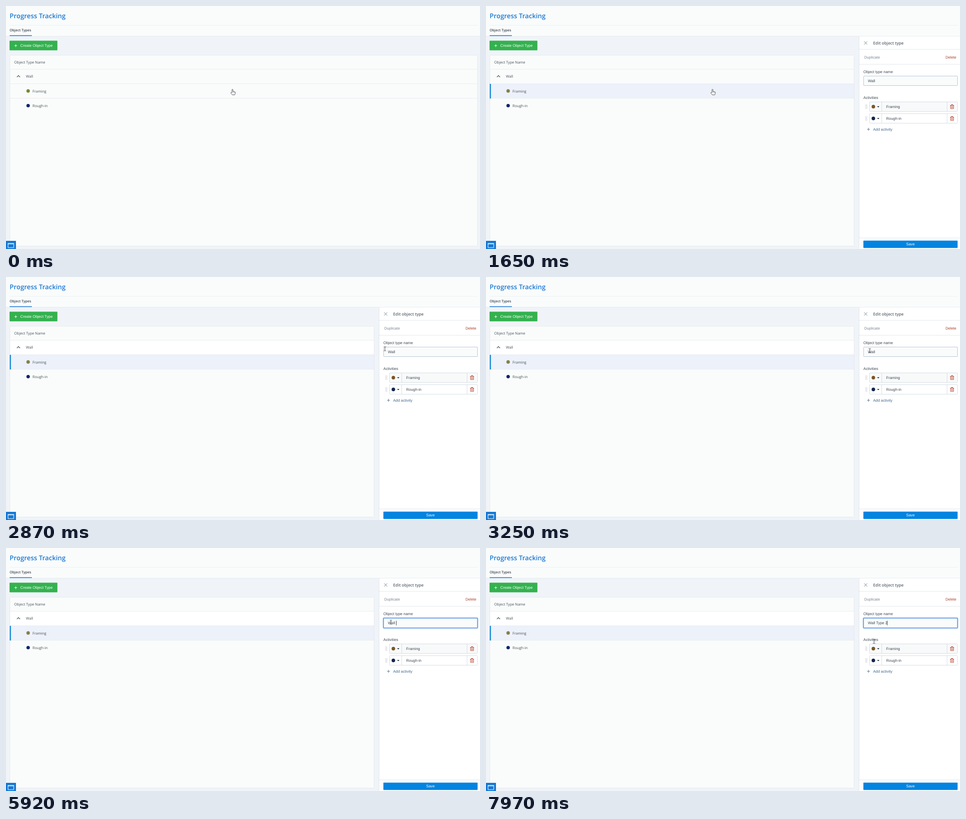
An HTML page with a canvas that plays this animation: 1045 by 536 pixels, repeating every 8 s.

```html
<!DOCTYPE html>
<html lang="en">
<head>
<meta charset="utf-8">
<title>Progress Tracking</title>
<style>
  html, body { margin: 0; width: 100%; height: 100%; overflow: hidden; background: #fafcfc; }
  canvas { display: block; width: 1045px; height: 536px; }
</style>
</head>
<body>
<canvas id="stage" width="1045" height="536"></canvas>
<script>
const ctx = document.getElementById('stage').getContext('2d');
const LOOP = 8000;
const SELECT_AT = 1480, PANEL_AT = 1560, HOVER_AT = 2160, LEAVE_AT = 2700, FOCUS_AT = 3310;
const UI = '"Open Sans", "Noto Sans", sans-serif';
const FORM = '"Liberation Sans", Arial, sans-serif';
const PAPER = '#fafcfc';

// Pointer path: time, x, y
const POINTER = [
  [0, 500.5, 190], [2090, 500.5, 190], [2300, 667, 169], [2490, 667, 169],
  [2560, 746, 154], [2640, 795, 153], [2760, 829, 156], [2950, 840, 160],
  [3250, 846, 162.5], [3300, 846, 162.5], [3520, 848.5, 163.5],
  [7500, 848.5, 163.5], [7620, 849, 168], [7970, 855.5, 206]
];

// Field states: time, text, caret index, caret visible
const TYPING = [
  [0, 'Wall', 0, false], [3400, 'Wall', 1, true], [3850, 'Wall', 2, true],
  [4050, 'Wall', 3, true], [4180, 'Wall', 4, true], [4700, 'Wall', 4, false],
  [4900, 'Wall ', 5, true], [5380, 'Wall ', 5, false], [5920, 'Wall ', 5, true],
  [6100, 'Wall T', 6, true], [6260, 'Wall Ty', 7, true], [6370, 'Wall Typ', 8, true],
  [6480, 'Wall Type', 9, true], [6660, 'Wall Type ', 10, true],
  [6870, 'Wall Type 2', 11, true], [7400, 'Wall Type 2', 11, false],
  [7930, 'Wall Type 2', 11, true]
];

const HAND = new Path2D('M-2.3 1V-5.3a1.1 1.1 0 0 1 2.2 0V-1.6l4 .9q1.4.4 1.2 1.9l-.6 3-.8 1.8H-1.4L-4.7 2.2q-.6-1.4.7-1.6z');

const clamp01 = v => Math.max(0, Math.min(1, v));

function rect(x, y, w, h, color) {
  ctx.fillStyle = color;
  ctx.fillRect(x, y, w, h);
}

function frame(x, y, w, h, color, fill, radius = 1) {
  ctx.beginPath();
  ctx.roundRect(x + .5, y + .5, w - 1, h - 1, radius);
  if (fill) { ctx.fillStyle = fill; ctx.fill(); }
  ctx.strokeStyle = color;
  ctx.lineWidth = 1;
  ctx.stroke();
}

function block(x, y, w, h, color) {
  ctx.beginPath();
  ctx.roundRect(x, y, w, h, 1.2);
  ctx.fillStyle = color;
  ctx.fill();
}

function dot(x, y, r, color) {
  ctx.beginPath();
  ctx.arc(x, y, r, 0, Math.PI * 2);
  ctx.fillStyle = color;
  ctx.fill();
}

function stroke(d, color, width = 1) {
  ctx.strokeStyle = color;
  ctx.lineWidth = width;
  ctx.stroke(new Path2D(d));
}

function text(str, x, y, color, size = 8, family = UI, weight = 400) {
  ctx.font = `${weight} ${size}px ${family}`;
  ctx.fillStyle = color;
  ctx.fillText(str, x, y);
}

const formText = (str, x, y, color = '#3d4750') => text(str, x, y, color, 8.3, FORM);

function pointerAt(t) {
  let i = POINTER.length - 1;
  while (i && POINTER[i][0] > t) i--;
  const a = POINTER[i], b = POINTER[i + 1] || a;
  const k = b === a ? 0 : (t - a[0]) / (b[0] - a[0]);
  return [a[1] + (b[1] - a[1]) * k, a[2] + (b[2] - a[2]) * k];
}

function drawHeader() {
  rect(0, 0, 1045, 536, PAPER);
  text('Progress Tracking', 8, 27, '#1e7ad3', 14.6, UI, 600);
  rect(8, 42, 1032, 1, '#eceff2');
  text('Object Types', 8, 56, '#3a4650', 7.7, UI, 600);
  rect(0, 66, 1045, 470, '#f0f4f8');
  rect(0, 66, 1045, 1, '#e8ecf1');
  rect(8, 64.5, 49, 1.7, '#2380d8');
  block(7.8, 76.4, 105.5, 21.4, '#34b14f');
  stroke('M18.5 87.5h6M21.5 84.5v6', '#fff');
  formText('Create Object Type', 31.5, 89.7, '#fff');
}

function drawTable(t) {
  const selected = t >= SELECT_AT;
  const right = t >= PANEL_AT ? 812 : 1040;
  const width = right - 9;
  frame(8, 108, right - 8, 422, '#e5e9ee', '#fafcfb');
  if (t >= HOVER_AT) rect(9, 140, width - 1, 31, t < LEAVE_AT ? '#f9fafc' : '#fff');
  if (selected) rect(9, 172, width - 1, 32, '#edf1fa');
  for (const y of [139, 171, 203]) rect(9, y, width - 1, 1, '#e8ecf0');
  if (selected) rect(8.3, 171.7, 2.5, 32.3, '#0e86d8');

  const ink = '#46505a';
  text('Object Type Name', 18, 127, ink);
  stroke('M24 156.8l3.5-3.5 3.5 3.5', '#2f3942', 1.1);
  text('Wall', 44, 158, ink);
  dot(48.8, 187.4, 3.8, selected ? '#83804a' : '#78883c');
  text('Framing', 58.5, 191, ink);
  dot(48.8, 219.7, 3.8, '#10256b');
  text('Rough-in', 58.5, 223, ink);
}

function drawDock() {
  rect(0, 518, 22, 18, '#1478d4');
  stroke('M4.5 523.5h12.5v9.5h-12.5zM4.5 525h12.5', '#fff', 1.1);
}

function drawActivity(name, y, color, fill) {
  for (let row = 0; row < 4; row++)
    for (const x of [836.5, 839]) rect(x, y - 4.5 + row * 2.6, 1.2, 1.2, '#a3abb4');
  frame(845, y - 11, 195, 22, '#d5dce3', fill);
  rect(872, y - 10, 1, 20, '#d5dce3');
  rect(1016, y - 10, 1, 20, '#d5dce3');
  dot(854, y, 3.9, color);
  ctx.fillStyle = '#222b33';
  ctx.fill(new Path2D(`M862.3 ${y - 1}h5l-2.5 2.7z`));
  formText(name, 882.3, y + 3);
  stroke(`M1023 ${y - 2.7}h9M1026 ${y - 2.9}v-1.6h3v1.6M1024.2 ${y - 2.5}v6.8h6.6v-6.8M1026.5 ${y - .8}v3.4M1028.6 ${y - .8}v3.4`, '#b2301f', .95);
}

function drawField(t) {
  const focus = clamp01((t - FOCUS_AT + 30) / 180);
  frame(832, 154, 208, 22, '#b4c4d3', PAPER, 1.5);
  if (focus) {
    ctx.globalAlpha = focus;
    ctx.beginPath();
    ctx.roundRect(832, 154.5, 207.7, 22, 1.5);
    ctx.strokeStyle = '#d3e3f8';
    ctx.lineWidth = 3;
    ctx.stroke();
    ctx.strokeStyle = '#5794e2';
    ctx.lineWidth = 1.6;
    ctx.stroke();
    ctx.globalAlpha = 1;
  }
  const [, value, index, caret] = TYPING.findLast(s => s[0] <= t);
  formText(value, 842, 168.3);
  if (caret) {
    const x = 842 + ctx.measureText(value.slice(0, index)).width;
    rect(Math.floor(x), 160.5, 1, 10, '#38424b');
  }
}

function drawPanel(t) {
  rect(822, 67, 223, 469, '#fff');
  rect(822, 67, 1, 469, '#dfe4ea');
  for (const y of [95, 128, 511]) rect(823, y, 222, 1, '#e3e7ec');
  stroke('M833.5 78l7 7M840.5 78l-7 7', '#66727d', .9);
  text('Edit object type', 853.5, 85, '#5a6570', 9, UI, 600);
  formText('Duplicate', 834, 116, '#7c868f');
  formText('Delete', 1013, 116, '#a8412c');
  formText('Object type name', 832, 148);
  drawField(t);
  formText('Activities', 832, 204.5);
  drawActivity('Framing', 222, '#7b5724', '#f8fafa');
  drawActivity('Rough-in', 248, '#11244a', '#fff');
  stroke('M840 272h6.5M843.25 268.8v6.5', '#44698c', .9);
  formText('Add activity', 853.5, 275, '#3d668c');
  block(832, 517.4, 207.7, 16.4, '#0284e0');
  formText('Save', 926.2, 528.2, '#fff');
}

function drawPointer(t) {
  const [x, y] = pointerAt(t);
  ctx.save();
  ctx.translate(x, y);
  if (x < 828) {
    ctx.fillStyle = '#fff';
    ctx.fill(HAND);
    ctx.strokeStyle = '#3c4248';
    ctx.lineWidth = .9;
    ctx.lineJoin = 'round';
    ctx.stroke(HAND);
    stroke('M-.1-1.4V1M1.9-1V1.2M3.7-.5V1.4', '#5b6167', .6);
  } else {
    stroke('M-2.5-4.5h1.7l.8.7.8-.7h1.7M0-4V4M-2.5 4.5h1.7l.8-.7.8.7h1.7', '#343a40', .9);
  }
  ctx.restore();
}

function draw(now) {
  const t = now % LOOP;
  ctx.textRendering = 'geometricPrecision';
  drawHeader();
  drawTable(t);
  if (t >= PANEL_AT) drawPanel(t);
  drawDock();
  drawPointer(t);
}

const start = performance.now();
function tick() {
  draw(performance.now() - start);
  requestAnimationFrame(tick);
}
tick();
</script>
</body>
</html>
```
